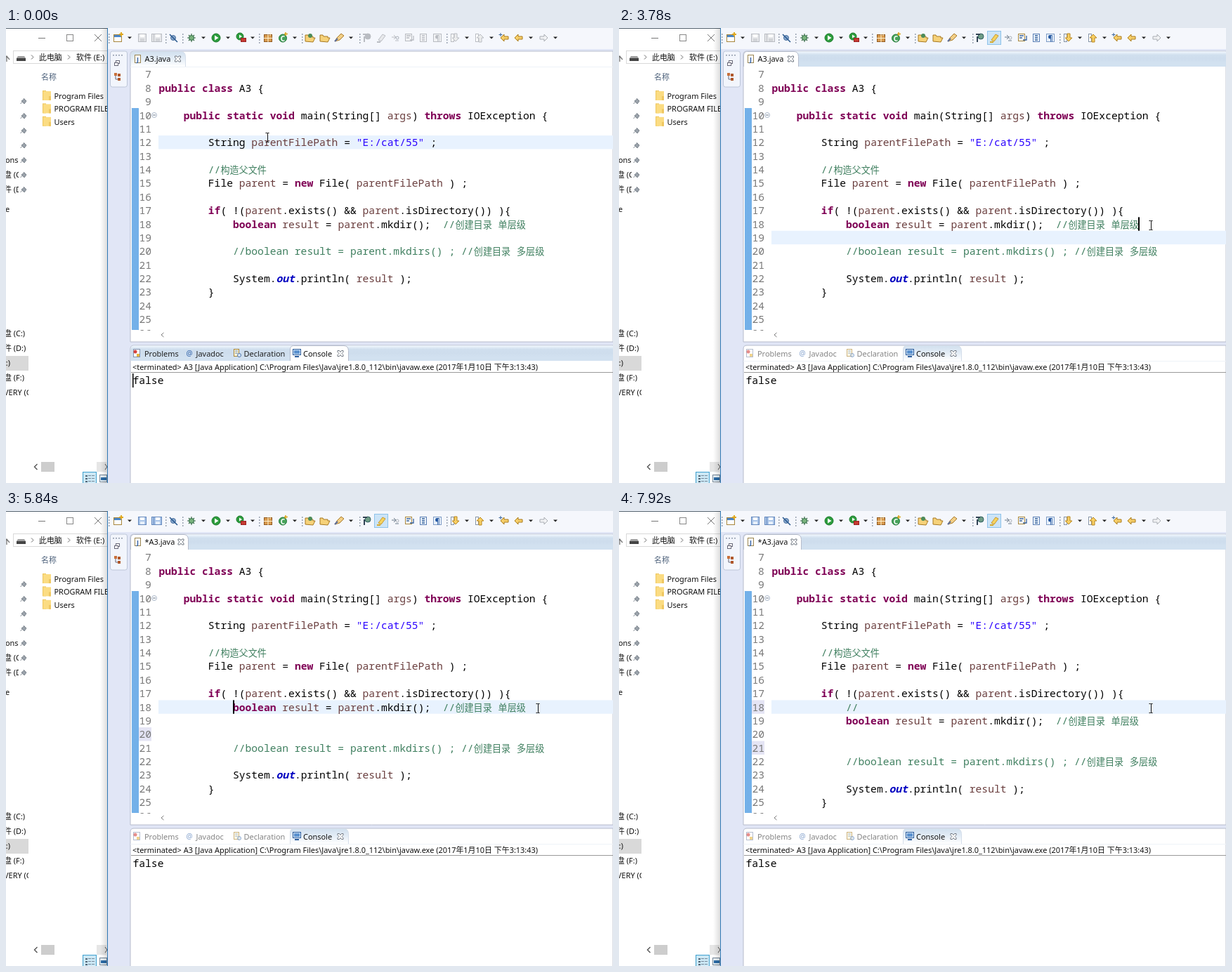
Recreate the animation shown at these times as an HTML page with a canvas. Size 864 by 648 pixels, loop 8000 ms.

```html
<!DOCTYPE html>
<html lang="zh">
<head>
<meta charset="utf-8">
<title>Java editor</title>
<style>
html, body { margin: 0; width: 100%; height: 100%; overflow: hidden; background: #fff; }
canvas { display: block; }
</style>
</head>
<body>
<canvas id="stage" width="864" height="648"></canvas>
<script>
const g = document.getElementById('stage').getContext('2d');
const LOOP = 8000, CHAR = 8.79, PITCH = 19.38, CODE_X = 217.5;
const MONO = '14.65px "Noto Sans Mono", monospace';
const CJK = '13.1px "Noto Sans CJK SC", sans-serif';
const UI = '10.93px "Noto Sans", "Noto Sans CJK SC", sans-serif';

const SOURCE = [
  '', 'public class A3 {', '',
  '    public static void main(String[] args) throws IOException {', '',
  '        String parentFilePath = "E:/cat/55" ;', '',
  '        //构造父文件',
  '        File parent = new File( parentFilePath ) ;', '',
  '        if( !(parent.exists() && parent.isDirectory()) ){',
  '            boolean result = parent.mkdir();  //创建目录 单层级', '',
  '            //boolean result = parent.mkdirs() ; //创建目录 多层级', '',
  '            System.out.println( result );',
  '        }', '', '', ''
];
const TOKEN = /(\/.*)|(".*?")|\b(public|class|static|void|throws|new|if|boolean)\b|\b(args|parentFilePath|parent|result)\b|\b(out)\b|\s+|\w+|./g;

// Timed states: [start, ...values]
const HIGHLIGHT = [[0, 12], [1720, 19], [3930, 18], [4890, 19], [5840, 18], [6150, 19], [6550, 18]];
const CARET = [[0], [1720, 323, 19], [2270], [2780, 323, 19], [3390], [3660, 739, 18], [4460],
  [4890, 323, 19], [5320], [5840, 323, 18], [6150, 323, 19], [6550, 323, 18], [7070],
  [7220, 332, 18], [7370, 340, 18], [7920]];
const CONSOLE_CARET = [[0, 1], [395, 0], [940, 1], [1450, 0]];
const MOUSE = [[0, 372, 156], [120, 374, 225], [270, 375, 262], [395, 376, 293], [520, 376, 311],
  [670, 376, 313], [940, 405, 309], [1060, 445, 305], [1180, 483, 302], [1330, 486, 300],
  [1450, 488, 299], [1570, 489, 298], [2270, 498, 293], [2390, 508, 288], [2510, 513, 285],
  [2660, 545, 283], [2780, 605, 282], [2900, 670, 282], [3020, 725, 282], [3140, 748, 282],
  [3390, 750, 282], [3510, 751, 282], [3660, 755, 281], [3780, 757, 281], [6150], [7220, 757, 281]];

const at = (steps, t) => steps.filter(s => s[0] <= t).pop().slice(1);
const lineTop = n => 153.1 + (n - 12) * PITCH;

function box(x, y, w, h, fill, stroke) {
  if (fill) { g.fillStyle = fill; g.fillRect(x, y, w, h); }
  if (stroke) { g.strokeStyle = stroke; g.lineWidth = 1; g.strokeRect(x + .5, y + .5, w - 1, h - 1); }
}
function path(d, stroke, fill, width = 1) {
  const p = new Path2D(d);
  if (fill) { g.fillStyle = fill; g.fill(p); }
  if (stroke) { g.strokeStyle = stroke; g.lineWidth = width; g.stroke(p); }
}
function disc(x, y, r, fill, stroke) {
  g.beginPath();
  g.arc(x, y, r, 0, 7);
  if (fill) { g.fillStyle = fill; g.fill(); }
  if (stroke) { g.strokeStyle = stroke; g.lineWidth = 1; g.stroke(); }
}
function text(s, x, y, color = '#111', font = UI) {
  g.font = font;
  g.fillStyle = color;
  g.fillText(s, x, y);
}
function clipped(x, y, w, h, draw) {
  g.save();
  g.beginPath();
  g.rect(x, y, w, h);
  g.clip();
  draw();
  g.restore();
}
function gradient(x0, y0, x1, y1, colors) {
  const grad = g.createLinearGradient(x0, y0, x1, y1);
  colors.forEach((c, i) => grad.addColorStop(i / (colors.length - 1), c));
  return grad;
}

function drawExplorer() {
  clipped(0, 0, 144, 648, () => {
    box(0, 0, 144, 648, '#fff');
    box(0, 0, 144, 1, '#53616e');
    path('M46 14.5h10M126 9l10 10M136 9l-10 10', '#777');
    box(86, 9, 10, 10, null, '#888');
    box(10, 32, 150, 19, null, '#d9d9d9');
    path('M-3 45l4-5 4 5M1 40v8', '#777', null, 1.3);
    path('M17 40h9l2 3h-13z', null, '#a0a0a0');
    box(15, 43, 13, 4, '#444');
    path('M36 38.500l3 3-3 3M88 38.500l3 3-3 3', '#666');
    text('此电脑', 47, 45.5);
    text('软件 (E:)', 100, 45.5);
    text('名称', 50, 74, '#4c607a');
    ['Program Files', 'PROGRAM FILES', 'Users'].forEach((name, i) => {
      const y = 89 + i * 18.4;
      box(52, y, 5, 14, '#eec65d');
      box(53, y + 1, 11, 13, '#fbdc82');
      box(61, y + 8, 3, 6, '#efc761');
      text(name, 68.5, y + 12);
    });
    for (let y = 104; y < 235; y += 21)
      path(`M25 ${y - 4}l4 4M26 ${y - 3}l-4 3 4 4 3-4M23.500 ${y + 1}l-3 3`, '#7d858e', '#9aa2aa');
  });
  clipped(0, 180, 18, 90, () => {
    ['ons-', '盘 (C:)', '件 (D:)'].forEach((s, i) => text(s, i ? -3 : -1, 192 + i * 21));
    text('e', -1, 262);
  });
  box(0, 467, 32, 21, '#d9d9d9');
  clipped(0, 420, 32, 110, () =>
    ['盘 (C:)', '件 (D:)', ' :)', '盘 (F:)', 'VERY (G:)'].forEach((s, i) => text(s, -3, 438.5 + i * 21.1)));
  path('M44.500 621l-4 4 4 4', '#555', null, 1.4);
  box(50, 618, 19, 14, '#cdcdcd');
  box(129, 618, 14, 14, '#e6e6e6');
  path('M141 621l3 4-3 4', '#555');
  box(109, 632, 20, 17, '#cce8f5', '#3fa0cf');
  for (let y = 637; y < 648; y += 4) {
    box(113, y, 3, 2, '#567');
    box(117, y, 4, 1, '#789');
    box(122, y, 4, 1, '#789');
  }
  box(133, 636, 11, 11, '#e8f2f8', '#789');
  box(135, 640, 8, 4, '#2d6da8');
  box(134, 0, 10, 648, gradient(134, 0, 144, 0, ['#0000', '#0002']));
}

function drawToolbar(editing, dirty) {
  const down = x => path(`M${x - 3} 12.500h6l-3 3z`, null, '#222');
  const on = (color, enabled) => enabled ? color : '#b9bcc2';
  const folder = x => path(`M${x - 6} 19v-9h4l1 2h6v2h3l-3 6z`, '#a87920', '#f6d27a');
  const arrow = (x, dir, color, fill) =>
    path(`M${x - 6 * dir} 14l${5 * dir}-5v3h${6 * dir}v4h${-6 * dir}v3z`, color, fill);
  box(145, 0, 719, 30, '#f5f7fc');
  for (const x of [146, 227, 251, 360, 421, 503, 627])
    for (let y = 8; y < 22; y += 4) box(x, y, 1.5, 2, '#9aa3b2');
  [176, 281, 316, 351, 411, 491, 656, 691, 747, 782].forEach(down);

  box(153, 9, 12, 11, '#fff', '#a8863c');
  box(154, 10, 10, 3, '#4a86c8');
  path('M164 6v6M161 9h6', '#e0a820', null, 2);
  for (const x of [194, 213, 216]) {
    box(x - 6, 8, 12, 12, dirty ? '#a9c4e8' : '#e6e7ea', on('#6488bd', dirty));
    box(x - 3, 9, 6, 4, '#fff');
    box(x - 3, 15, 6, 4, dirty ? '#e8f0fa' : '#d2d4d8');
  }
  disc(238, 14, 3.5, '#89a9cf', '#476d9c');
  path('M233 9l11 11', '#25558c', null, 1.5);
  path('M258 14h12M264 8v12M260 10l8 8M268 10l-8 8', '#3c6b48', null, 1.2);
  disc(264, 14, 3.5, '#79b27d', '#2f6b45');
  disc(299, 14, 6, '#2c9c3c', '#1b7a2c');
  path('M297 10.500l5.500 3.500-5.500 3.500z', null, '#fff');
  disc(333, 12, 5, '#2c9c3c', '#1b7a2c');
  path('M332 9.500l4 2.500-4 2.500z', null, '#fff');
  box(334, 14, 8, 6, '#c63a32', '#922');
  box(367, 9, 12, 11, '#d79a4f', '#91591f');
  path('M373 9v11M367 14.500h12M376 6v5', '#fff3d0');
  disc(394, 14.5, 5.5, '#47a35b', '#267a3c');
  text('C', 390.8, 18.5, '#fff', 'bold 10px "Noto Sans", sans-serif');
  path('M398 6v5M396 8.500h5', '#dba51f', null, 1.6);
  folder(432);
  disc(433, 11, 3, '#4d8b58');
  folder(453);
  path('M468 19l3-5 6-6 4 3-6 6z', '#a8782a', '#f2cf86');
  path('M468 19l4-4', '#5a6ea0', null, 2);

  if (editing) box(524, 4, 20, 20, '#cce4f7', '#8fc3ea');
  disc(515, 12, 4, on('#6e9c86', editing), on('#315f61', editing));
  path('M508 9h6M510 12v8', on('#345', editing), null, 2);
  path('M530 17l6-8 4 2-6 8z', on('#c8962e', editing), editing ? '#f5d35f' : '#e8e9ec');
  path('M528 20h5', on('#d8a928', editing), null, 2);
  path('M549 13h5M552 10l3 3-3 3M554 18h5', on('#697889', editing));
  disc(557, 14, 2, null, '#aab0b8');
  box(568, 8, 10, 11, editing ? '#fff' : '#f2f3f5', on('#a8863c', editing));
  path('M570 11h6M570 14h4M580 11v6h-5', on('#34609b', editing), null, 1.3);
  box(589, 8, 10, 12, editing ? '#eaf2fb' : '#f2f3f5', on('#5b7fb5', editing));
  path('M592 11h4M592 14h4M592 17h4', on('#34609b', editing), null, 1.5);
  box(608, 8, 12, 12, editing ? '#eaf2fb' : '#f2f3f5', on('#7f9cc6', editing));
  text('¶', 610.5, 18, on('#2356a0', editing), 'bold 11px "Noto Sans", sans-serif');
  [[638, 1], [673, -1]].forEach(([x, s]) => {
    box(x - 5, 8, 5, 12, '#fff', on('#8694a8', editing));
    path(`M${x} ${14 - 6 * s}v${6 * s}h-3l5 ${5 * s} 5 ${-5 * s}h-3v${-6 * s}z`,
      on('#b98620', editing), editing ? '#f7cf64' : '#eceded');
  });
  arrow(710, 1, '#ab7b1a', '#f6cf6a');
  path('M704 7v5M701.500 9.500h5', '#39659b');
  arrow(730, 1, '#ab7b1a', '#f6cf6a');
  arrow(765, -1, '#a9adb3', '#f1f2f4');
}

function drawTrim() {
  box(145, 30, 719, 618, '#e1e6f6');
  path('M148.500 36q0-3 3-3h18q3 0 3 3v45q0 3-3 3h-18q-3 0-3-3z', '#bdc6d8', '#f2f5fc');
  for (let x = 152; x < 168; x += 4) box(x, 38, 2, 1.5, '#929cad');
  box(156, 46, 6, 5, '#fff', '#667');
  box(154, 49, 6, 5, '#fff', '#667');
  box(154, 64, 4, 4, '#c9703a');
  box(159, 65, 4, 4, '#b0582c');
  box(159, 71, 4, 4, '#b0582c');
  path('M156 68v5h3', '#667');
  box(144, 0, 1, 648, '#2f78b4');
}

function drawPane(top, bottom, tabLeft, tabRight, active) {
  const base = top + 22;
  const shade = colors => gradient(0, top, 0, base, colors);
  path(`M177 ${bottom}V${top + 5}q0-5 5-5H864V${bottom}z`, '#b6bccc', '#fff');
  if (active) path(`M177.500 ${base}V${top + 5}q0-5 5-4.500H864V${base}z`, null,
    shade(['#f3f9ff', '#d0dfee', '#cedded', '#d2e1f0', '#d2e1f0']));
  path(`M${tabLeft + .5} ${base}V${top + 6}q0-5.500 5-5.500H${tabRight - 7}q6 0 6.500 7V${base}`,
    active ? '#b6bccc' : '#d5deea', active ? '#fff' : shade(['#d0dfee', '#e4edf6', '#fff']));
  if (!active) box(177, base, 687, 1, '#eef2f8');
}
function closeMark(x, y) {
  path(`M${x - 4} ${y - 4}h2.500l1.500 2 1.500-2h2.500v2l-2 2 2 2v2h-2.500l-1.500-2-1.500 2h-2.500v-2l2-2-2-2z`, '#6f7680', '#fff');
}

function drawCodeLine(line, x, y) {
  for (const [s, comment, string, keyword, local, field] of line.matchAll(TOKEN)) {
    const color = comment ? '#3f7f5f' : string ? '#2a00ff' : keyword ? '#7f0055'
      : local ? '#6a3e3e' : field ? '#0000c0' : '#000';
    const style = keyword ? 'bold ' : field ? 'italic bold ' : '';
    for (const run of s.match(/[\u4e00-\u9fff]+|[^\u4e00-\u9fff]+/g)) {
      const wide = run > '\u4e00';
      text(run, x, y, color, wide ? CJK : style + MONO);
      x += run.length * (wide ? 13.1 : CHAR);
    }
  }
}

function drawEditor(t) {
  const dirty = t >= 4890, editing = t >= 1720;
  drawPane(33, 447, 177, dirty ? 260 : 256, editing);
  box(183, 38, 9, 12, '#fff', '#9a8550');
  text('J', 186, 48, '#2f5fa5', 'bold 9px "Noto Sans", sans-serif');
  text(dirty ? '*A3.java' : 'A3.java', 197.5, 48);
  closeMark(dirty ? 249 : 244.5, 44);

  const lines = SOURCE.slice();
  if (dirty) lines.splice(12, 0, '');
  if (t >= 6150) lines.splice(11, 0, ' '.repeat(12) + (t >= 7370 ? '//' : t >= 7220 ? '/' : ''));
  const changed = t >= 6150 ? [18, 21] : dirty ? [20] : [];
  const [current] = at(HIGHLIGHT, t);

  clipped(177, 56, 687, 375, () => {
    box(179, 114, 10, 316, '#a9d2f5');
    g.fillStyle = '#3d8fdc';
    for (let y = 114; y < 430; y++)
      for (let x = 179 + y % 2; x < 189; x += 2) g.fillRect(x, y, 1, 1);
    box(217, lineTop(current), 647, PITCH, '#e8f2fe');
    changed.forEach(n => box(189, lineTop(n), 18, PITCH, '#e4e4f4'));
    for (let n = 7; n <= 26; n++) {
      const y = Math.round(lineTop(n) + 15.2);
      text(n, n < 10 ? 198 : 189.4, y, '#787878', MONO);
      drawCodeLine(lines[n - 7], CODE_X, y);
    }
    disc(211, 124, 3.5, '#fff', '#a9b6c8');
    path('M209 124h4', '#69788c');
  });
  path('M224.500 434l-3.500 3 3.500 3', '#777');
  const [x, n] = at(CARET, t);
  if (x) box(x, lineTop(n), 2, PITCH, '#000');
}

function drawConsole(t) {
  const active = t < 1720, dim = active ? '#222' : '#858585';
  drawPane(452, 649, 404, 488, active);
  g.globalAlpha = active ? 1 : .6;
  box(181, 457, 10, 12, '#fff', '#8392ad');
  disc(184, 461, 2.5, '#d64540');
  box(186, 464, 4, 4, '#e6b640');
  text('@', 256.5, 467, '#2c5fa8', '10px "Noto Sans", sans-serif');
  box(324, 457, 8, 11, '#fff6d8', '#a8863c');
  path('M326 460h4M326 463h4', '#5d7fac');
  disc(332, 466, 2.5, '#dce9f8', '#4b75ad');
  g.globalAlpha = 1;
  text('Problems', 197, 467.5, dim);
  text('Javadoc', 270.5, 467.5, dim);
  text('Declaration', 338.5, 467.5, dim);
  box(408, 457, 12, 9, '#d9e9fa', '#285a9b');
  box(410, 459, 8, 5, '#5d93cf');
  box(411, 467, 6, 2, '#285a9b');
  text('Console', 423, 467.5);
  closeMark(476, 463.5);
  text('<terminated> A3 [Java Application] C:\\Program Files\\Java\\jre1.8.0_112\\bin\\javaw.exe (2017年1月10日 下午3:13:43)', 180, 487);
  box(178, 490, 686, 1, '#9a9a9a');
  text('false', 180.5, 507, '#000', MONO);
  if (active && at(CONSOLE_CARET, t)[0]) box(180, 492, 1.5, 20, '#000');
}

function draw() {
  const t = performance.now() % LOOP;
  drawExplorer();
  drawToolbar(t >= 1720, t >= 4890);
  drawTrim();
  drawEditor(t);
  drawConsole(t);
  if (t >= 7220 && t < 7370) box(324, 290, 354, 241, '#fff', '#b4b4b4');
  const [x, y] = at(MOUSE, t);
  if (x) path(`M${x - 2.5} ${y - 6.5}h2l.5.5.5-.5h2M${x + .5} ${y - 6}v12M${x - 2.5} ${y + 6.5}h2l.5-.5.5.5h2`, '#111');
  requestAnimationFrame(draw);
}
draw();
</script>
</body>
</html>
```
